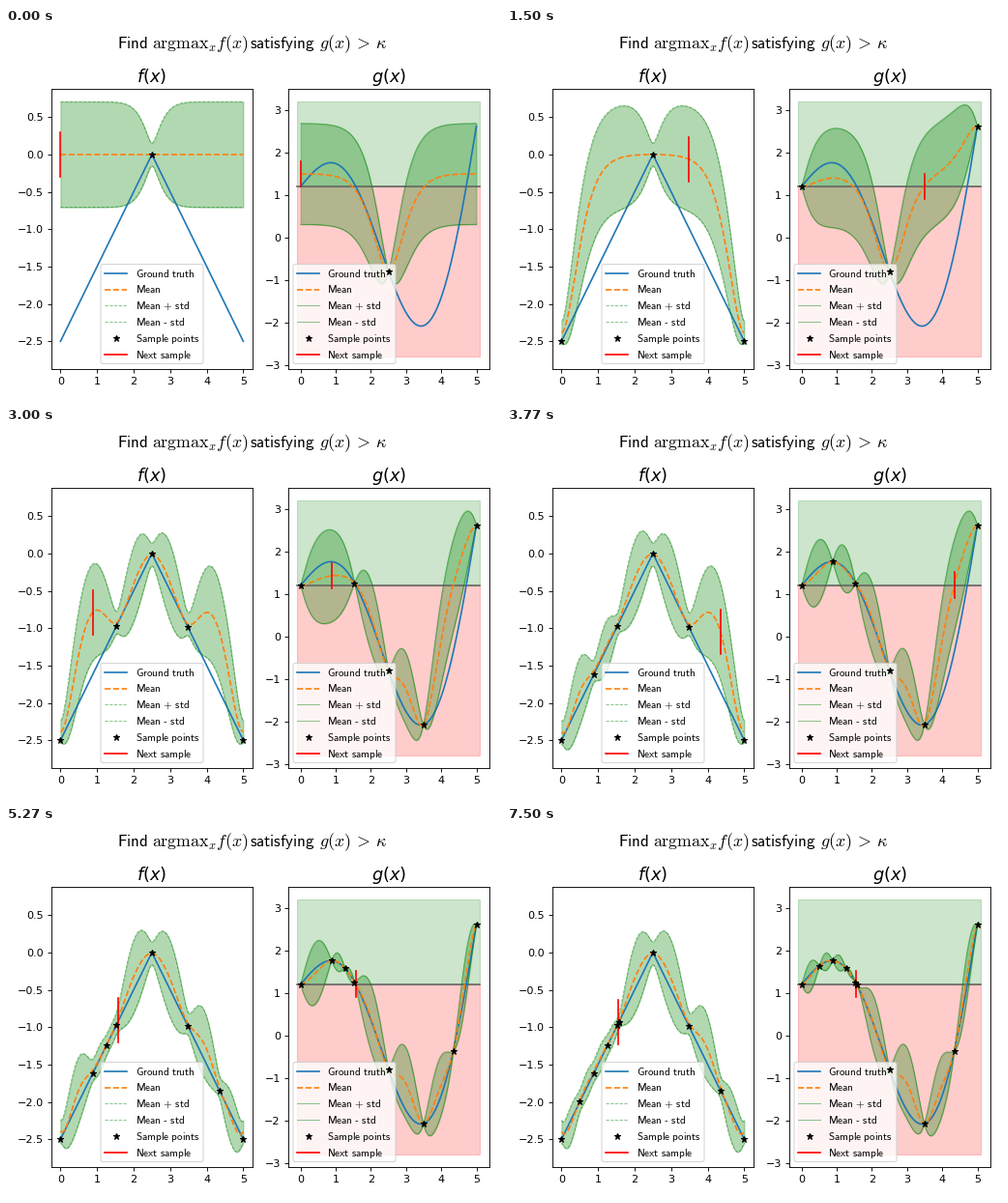
Animation of 512x384 px, one loop 8 s. Source, as a matplotlib script:

```python
import numpy as np
import matplotlib.pyplot as plt
from matplotlib.animation import FuncAnimation
from matplotlib.patches import FancyBboxPatch

W, H, DPI = 512, 384, 80
FRAMES, INTERVAL, HOLD = 32, 250, 3   # each step is held for three frames
KAPPA, SCALE, BAR = 1.2, 0.5, 0.3

# order in which the points are sampled; the one after the known set is "next"
PICKS = [2.5, 0, 5, 3.49, 1.533, 0.88, 4.345, 1.26, 1.565, 0.505, 1.57, 1.56]
grid = np.linspace(0, 5, 401)


def f(x):
    return -np.abs(x - 2.5)


def g(x):
    return x * np.cos(x) + 1.2


def matern(a, b):
    d = np.sqrt(5) * np.abs(np.subtract.outer(a, b)) / SCALE
    return (1 + d + d**2 / 3) * np.exp(-d)


def posterior(xs, ys, prior, var, noise, at):
    """Mean and standard deviation of a Gaussian process at the given points."""
    gain = np.linalg.solve(matern(xs, xs) + noise / var * np.eye(len(xs)),
                           matern(xs, at))
    mean = prior + gain.T @ (ys - prior)
    left = 1 - np.sum(matern(xs, at) * gain, axis=0)
    return mean, np.sqrt(var * np.clip(left, 0, None))


def sans(*words):
    return "$" + r"\ ".join(
        w if w.startswith("{") else r"\mathsf{%s}" % w for w in words) + "$"


LABELS = [sans("Ground", "truth"), sans("Mean"), sans("Mean", "{+}", "std"),
          sans("Mean", "{\u2010}", "std"), sans("Sample", "points"),
          sans("Next", "sample")]


class Panel:
    def __init__(self, fig, x0, title, func, prior, var, noise, style, key_x):
        self.func, self.gp = func, (prior, var, noise)
        self.ax = ax = fig.add_axes([x0 / W, 31 / H, 208 / W, 290 / H])
        ax.set_title(title, fontsize=16)
        if func is g:
            self.regions()
        self.band = ax.fill_between(grid, grid, grid, color="green", alpha=0.3)
        truth, = ax.plot(grid, func(grid), color="tab:blue")
        self.mean, = ax.plot([], [], "--", color="tab:orange")
        edge = dict(color="green", ls=style, lw=0.8, alpha=0.5)
        self.upper, = ax.plot([], [], **edge)
        self.lower, = ax.plot([], [], **edge)
        self.stars, = ax.plot([], [], "k*", ms=6, zorder=10)
        self.next, = ax.plot([], [], color="red")
        self.key(key_x, [truth, self.mean, self.upper, self.lower,
                         self.stars, self.next])

    def regions(self):
        span = [-0.1, 5.1]
        self.ax.fill_between(span, KAPPA, 3.2, color="green", alpha=0.2)
        self.ax.fill_between(span, -2.8, KAPPA, color="red", alpha=0.2)
        self.ax.plot(span, [KAPPA] * 2, color="dimgray")

    def key(self, x, lines):
        """Legend laid out in pixels, with evenly spaced rows."""
        self.ax.add_patch(FancyBboxPatch(
            (x, 36.5), 106, 103, boxstyle="round,pad=0,rounding_size=2.2",
            fc="white", ec="0.8", alpha=0.8, zorder=5, transform=None))
        for i, (line, label) in enumerate(zip(lines, LABELS)):
            y = 130.3 - 16.8 * i
            xs = [x + 15.5] if line is self.stars else [x + 4.4, x + 26.6]
            self.ax.plot(xs, [y] * len(xs), transform=None, zorder=6,
                         color=line.get_color(), ls=line.get_linestyle(),
                         lw=line.get_linewidth(), alpha=line.get_alpha(),
                         marker=line.get_marker(), ms=6)
            self.ax.text(x + 35.5, y - 3.9, label, transform=None, fontsize=10,
                         va="baseline", math_fontfamily="cm", zorder=6)

    def show(self, step):
        xs, new = np.array(PICKS[:step + 1], float), PICKS[step + 1]
        ys = self.func(xs)
        mean, std = posterior(xs, ys, *self.gp, grid)
        top, low = mean + std, mean - std
        self.mean.set_data(grid, mean)
        self.upper.set_data(grid, top)
        self.lower.set_data(grid, low)
        self.band.set_verts([np.column_stack([
            np.r_[grid, grid[::-1]], np.r_[top, low[::-1]]])])
        self.stars.set_data(xs, ys)
        mid = posterior(xs, ys, *self.gp, np.array([new]))[0][0]
        self.next.set_data([new, new], [mid - BAR, mid + BAR])


fig = plt.figure(figsize=(W / DPI, H / DPI), dpi=DPI, facecolor="white")

for x, size, text in [
        (115, 15.2, sans("Find")),
        (151.3, 16, r"$\mathrm{argmax}_x f(x)$"),
        (252.3, 15.4, sans("satisfying")),
        (324.5, 16.2, r"$g(x)\, >\, \kappa$")]:
    fig.text(x / W, 1 - 21 / H, text, fontsize=size, va="baseline",
             math_fontfamily="cm")

panels = [
    Panel(fig, 46.9, "$f(x)$", f, 0, 0.5, 0.025, "--", 98),
    Panel(fig, 291.6, "$g(x)$", g, 1.5, 2**0.5, 1e-6, "-", 297),
]
panels[0].ax.set(xlim=(-0.25, 5.25), ylim=(-2.871, 0.878))
panels[1].ax.set(xlim=(-0.36, 5.36), ylim=(-3.1, 3.5))


def update(i):
    for panel in panels:
        panel.show(i // HOLD)
    return []


anim = FuncAnimation(fig, update, frames=FRAMES, interval=INTERVAL,
                     init_func=lambda: update(0), repeat=True, repeat_delay=0)
plt.show()
```
